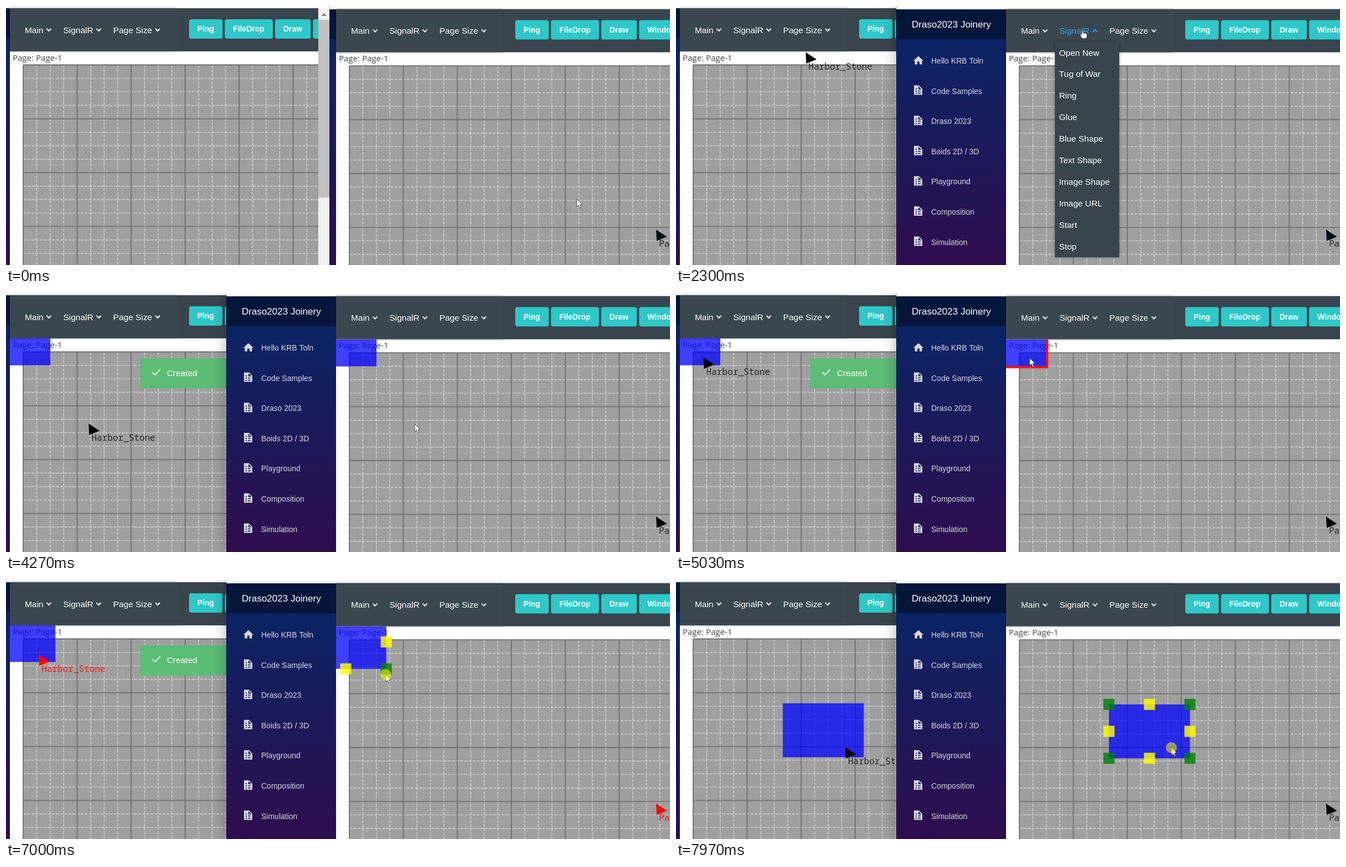
Recreate the animation shown at these times as an HTML page with a canvas. Size 1197 px wide and 468 px high, loop 8 s.

```html
<!DOCTYPE html>
<html lang="en">
<head>
<meta charset="utf-8">
<title>Shared drawing</title>
<style>
html, body { margin: 0; width: 100%; height: 100%; overflow: hidden; background: #fff; }
canvas { display: block; }
</style>
</head>
<body>
<canvas id="stage" width="1197" height="468"></canvas>
<script>
const c = document.getElementById('stage').getContext('2d');
const W = 1197, H = 468, LOOP = 8000;
const SANS = '"Liberation Sans", Arial, sans-serif';
const MONO = '"Noto Sans Mono", monospace';
const PAGE_FONT = '"Open Sans", sans-serif';
const USER = 'Harbor_Stone';
const NAV = ['Hello KRB Toln', 'Code Samples', 'Draso 2023', 'Boids 2D / 3D', 'Playground', 'Composition', 'Simulation'];
const ITEMS = ['Open New', 'Tug of War', 'Ring', 'Glue', 'Blue Shape', 'Text Shape', 'Image Shape', 'Image URL', 'Start', 'Stop'];
const BLOCK_W = 146, BLOCK_H = 97.4;
const DROP = { x: 683, y: 64.5, w: 116, row: 38.95 };
const SHIFT = { x: 588, y: 1.6 }; // right page relative to the left one

// moments of the interaction
const LEAVE = 711, RAISE = 1650, OPEN = 1720, PICK = 3510, RETURN = 4270, HOVER = 4700,
      PRESS = 5910, TOAST_END = 7650, RELEASE = 7850;
// how late each part follows the pointer
const SHAPE_LAG = 126, USER_LAG = 161, REMOTE_LAG = 196;

// Eased pointer moves; bend > 1 makes x start later than y.
const START = [1029, 349];
const MOVES = [
  { from: 70, to: 250, x: 1000, y: 390 },
  { from: 250, to: 830, x: 800, y: 47 },
  { from: 890, to: 1370, x: 733, y: 44 },
  { from: 2400, to: 3040, x: 737, y: 237 },
  { from: RETURN, to: 4860, x: 637.5, y: 117.5 },
  { from: 6290, to: 6380, x: 641, y: 126 },
  { from: 6720, to: 7575, x: 893, y: 303, bend: 1.28 }
];

function pointer(t) {
  let [x, y] = START;
  for (const m of MOVES) {
    const u = Math.max(0, Math.min(1, (t - m.from) / (m.to - m.from)));
    const p = u * u * (3 - 2 * u);
    x += (m.x - x) * p ** (m.bend || 1);
    y += (m.y - y) * p;
  }
  return [x, y];
}

function box(x, y, w, h, fill) {
  c.fillStyle = fill;
  c.fillRect(x, y, w, h);
}

function round(x, y, w, h, r, fill) {
  c.beginPath();
  c.roundRect(x, y, w, h, r);
  c.fillStyle = fill;
  c.fill();
}

function text(s, x, mid, size, fill, family = SANS, weight = '') {
  c.font = `${weight} ${size}px ${family}`;
  c.fillStyle = fill;
  c.fillText(s, x, mid + size * .36);
}

function width(s, size, weight = '') {
  c.font = `${weight} ${size}px ${SANS}`;
  return c.measureText(s).width;
}

function trace(x, y, points) {
  c.beginPath();
  points.forEach(([px, py]) => c.lineTo(x + px, y + py));
}

function poly(x, y, points, fill) {
  trace(x, y, points);
  c.closePath();
  c.fillStyle = fill;
  c.fill();
}

function line(x, y, points, color, thick) {
  trace(x, y, points);
  outline(color, thick);
}

function outline(color, thick) {
  c.strokeStyle = color;
  c.lineWidth = thick;
  c.stroke();
}

function clipped(x, y, w, h, draw) {
  c.save();
  c.beginPath();
  c.rect(x, y, w, h);
  c.clip();
  draw();
  c.restore();
}

function glowing(color, blur, draw) {
  c.save();
  c.shadowColor = color;
  c.shadowBlur = blur;
  draw();
  c.restore();
}

// Header parts sit one after another, spaced by their own text widths.
let left = 34;
const menus = ['Main', 'SignalR', 'Page Size'].map(label => {
  const x = left, tip = x + width(label, 15.4) + 10;
  left = tip + 26;
  return { label, x, tip };
});
left = 330;
const buttons = ['Ping', 'FileDrop', 'Draw', 'Window'].map(label => {
  const x = left, w = width(label, 13.9, 'bold') + 30.3;
  left = x + w + 4;
  return { label, x, w };
});

function sidebar(x, w, top) {
  const g = c.createLinearGradient(0, top, 0, 590);
  g.addColorStop(0, '#052767');
  g.addColorStop(1, '#3a0647');
  box(x, top, w, H, g);
  box(x, top, w, 54, 'rgba(0,0,0,.42)');
}

function house(x, y, ink) {
  poly(x, y, [[-9, 0], [0, -8.5], [9, 0]], ink);
  box(x - 6.5, y, 4.5, 6.5, ink);
  box(x + 2, y, 4.5, 6.5, ink);
  box(x - 2, y - 1, 4, 2.5, ink);
}

function sheet(x, y, ink, hole) {
  poly(x, y, [[0, 0], [9, 0], [15, 6], [15, 17], [0, 17]], ink);
  poly(x, y, [[8, 1.5], [8, 7], [13.5, 7]], hole);
  for (let row = 5; row < 14; row += 4) box(x + 3, y + row, 2, 2, hole);
  box(x + 7, y + 9, 5, 1.5, hole);
  box(x + 7, y + 13, 5, 1.5, hole);
}

function nav() {
  const ink = '#d7d7dc';
  text('Draso2023 Joinery', 425, 33, 17, '#fff');
  NAV.forEach((label, i) => {
    const y = 99 + i * 54.6;
    text(label, 460, y, 14, ink);
    if (i) sheet(429, y - 10, ink, '#14205f');
    else house(437, y, ink);
  });
}

function grid() {
  const step = 24.33, x0 = 31, y0 = 106.5;
  box(x0, y0, W, H, '#9f9f9f');
  const rule = (every, color, thick) => {
    for (let i = 0; i <= 24; i += every) {
      const d = i * step;
      line(x0, y0, [[d, 0], [d, H]], color, thick);
      line(x0, y0, [[0, d], [W, d]], color, thick);
    }
  };
  c.setLineDash([5.5, 1.9]);
  rule(1, 'rgba(222,222,222,.8)', 1.4);
  c.setLineDash([]);
  rule(4, '#6c6c6c', 1.8);
}

function user(x, y, name, color) {
  poly(x, y, [[0, 0], [19.5, 13], [1, 20.5]], color);
  text(name, x + 5, y + 25.5, 16, color === 'red' ? '#f01c1c' : '#262626', MONO);
}

function block(x, y) {
  box(x - BLOCK_W / 2, y - BLOCK_H / 2, BLOCK_W, BLOCK_H, 'rgba(0,0,255,.75)');
}

function handles(x, y) {
  for (let i = -1; i <= 1; i++)
    for (let j = -1; j <= 1; j++)
      if (i || j)
        box(x + i * BLOCK_W / 2 - 10, y + j * BLOCK_H / 2 - 10, 20, 20,
            i && j ? 'rgba(0,128,0,.8)' : 'rgba(255,255,0,.82)');
}

function header(active, open) {
  glowing('rgba(0,0,0,.35)', 4, () => box(7, 4, 301, 78, '#3a474f'));
  box(308, 4, W, 78, '#38454c');
  menus.forEach(({ label, x, tip }, i) => {
    const color = i === active ? '#419fdb' : '#fff';
    const d = i === active && open ? -2 : 2;
    text(label, x, 43, 15.4, color);
    line(tip, 43, [[-4, -d], [0, d], [4, -d]], color, 2);
  });
  buttons.forEach(({ label, x, w }) => {
    round(x, 24, w, 35, 4, '#2ec8c8');
    text(label, x + 15, 41.3, 13.9, '#fff', SANS, 'bold');
  });
}

// One browser page: white sheet, grid, header, then the shared shapes.
function page(right, active, open, shapes) {
  c.save();
  if (right) c.translate(SHIFT.x, SHIFT.y);
  box(7, 4, W, H, '#fff');
  text('Page: Page-1', 12, 93.3, 15, '#444', PAGE_FONT);
  grid();
  header(active, open);
  c.restore();
  clipped(right ? 595 : 7, right ? 84 : 82, W, H, shapes);
}

// Middle of the block as placed in the right window.
function middle(t, lag) {
  if (t < PRESS + lag) return [595, 84];
  const [x, y] = pointer(t - lag);
  return [x - 39.5, y - 29.5];
}

function toast() {
  box(242, 118, 300, 54, '#5bbd76');
  line(264, 143.5, [[0, 0], [4.5, 4.5], [14, -5.5]], '#fff', 1.8);
  text('Created', 290, 144.3, 15.4, '#fff');
}

function leftWindow(t, color) {
  clipped(0, 0, 583, H, () => {
    box(0, 0, 583, H, '#fbfdf9');
    sidebar(0, 7, 4);
    page(false, -1, false, () => {
      if (t >= PICK + 70) {
        const [x, y] = middle(t, REMOTE_LAG);
        block(x - SHIFT.x, y - 2);
      }
      if (t >= 70) {
        const seen = t - USER_LAG;
        const [x, y] = pointer(t < RETURN ? Math.min(seen, LEAVE) : seen);
        user(x - SHIFT.x, y - 1, USER, color);
      }
      if (t >= PICK + 100 && t < TOAST_END) toast();
    });
    box(563, 4, 20, H, '#f1f1f1');
    box(563, 25, 20, 321, '#c1c1c1');
    poly(573, 18, [[-5, 0], [0, -5.5], [5, 0]], '#8a8a8a');
  });
}

function rightWindow(t, active, open, color) {
  const raised = t >= RAISE, x = raised ? 397 : 583;
  glowing('rgba(0,0,0,.3)', raised ? 24 : 0, () => box(x, 0, W, H, '#fbfdf9'));
  box(x, 0, 1, 6, '#b4b8b4');
  sidebar(x, 595 - x, 6);
  if (raised) nav();
  page(true, active, open, () => {
    if (t >= PICK) {
      const [bx, by] = middle(t, SHAPE_LAG);
      block(bx, by);
      if (t >= PRESS + 50) handles(bx, by);
      else if (t >= HOVER) glowing('red', 2, () => {
        c.beginPath();
        c.rect(bx - 74, by - 49.7, 148, 99.4);
        outline('#f0101c', 3.5);
      });
    }
    user(1172, 404, 'Pa', t < PICK ? '#060c1c' : color);
  });
}

function dropdown(t, pointerY) {
  const { x, y, w, row } = DROP;
  const h = Math.min(1, (t - OPEN) / 250) * row * ITEMS.length;
  const at = Math.floor((pointerY - y) / row);
  glowing('rgba(0,0,0,.4)', 5, () => box(x, y, w, h, '#38454c'));
  clipped(x, y, w, h, () => ITEMS.forEach((label, i) => {
    const top = y + i * row;
    if (i === at) box(x, top, w, row, '#50a9da');
    text(label, x + 7.5, top + row / 2, 15.4, '#fff');
  }));
}

function arrow(x, y) {
  poly(x, y, [[0, 0], [0, 13.5], [3.2, 10.7], [5.4, 15.6], [7.6, 14.6], [5.5, 9.9], [9.6, 9.6]], '#fff');
  outline('#333', .8);
}

function hand(x, y) {
  round(x - 4, y + 5, 12, 10, [3, 3, 4, 6], '#fff');
  outline('#222', .9);
  round(x - 1.5, y, 3, 10, 1.5, '#fff');
  outline('#222', .9);
  box(x - 1, y + 6, 5, 6, '#fff');
}

function draw(t) {
  const [x, y] = pointer(t);
  const over = y > 20 && y < 64
    ? menus.findIndex(m => x - SHIFT.x > m.x - 8 && x - SHIFT.x < m.tip + 13) : -1;
  const open = t >= OPEN && t < PICK;
  const active = open ? 1 : over;
  const color = t >= PRESS + 70 && t < RELEASE ? 'red' : '#000';

  const layers = [() => rightWindow(t, active, open, color), () => leftWindow(t, color)];
  if (t >= RAISE) layers.reverse();
  layers.forEach(layer => layer());
  if (open) dropdown(t, y);

  (over < 0 ? arrow : hand)(x, y);
  if (t >= PRESS) round(x - 10, y - 10, 20, 20, 10, 'rgba(255,255,0,.52)');
}

function tick(now) {
  draw(now % LOOP);
  requestAnimationFrame(tick);
}
requestAnimationFrame(tick);
</script>
</body>
</html>
```
